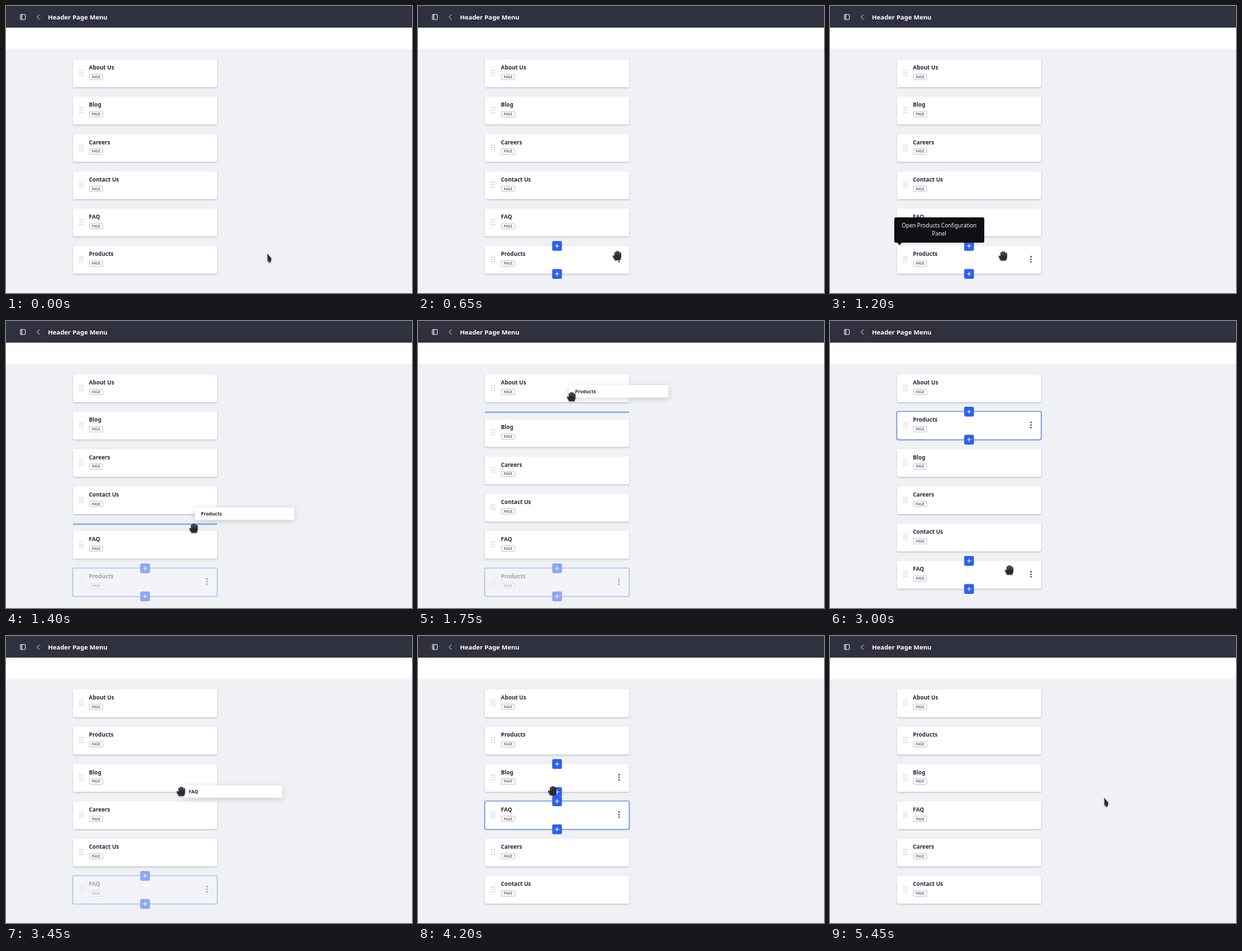
Animation of 600x425 px, one loop 7350 ms. Source, as an HTML page:

```html
<!DOCTYPE html>
<html lang="en">
<head>
<meta charset="utf-8">
<title>Menu reordering</title>
<style>
  html, body { margin: 0; width: 100%; height: 100%; overflow: hidden; background: #eff1f4; }
  svg { display: block; width: 100vw; height: 100vh; font-family: "Noto Sans", "Open Sans", sans-serif; }
  .title { font-size: 8.2px; font-weight: 600; fill: #272833; }
  .badge { font-size: 5px; font-weight: 600; fill: #6b6c7e; }
  .lift { filter: drop-shadow(0 1px 1px rgba(39, 40, 51, .28)); }
  .float { filter: drop-shadow(0 2px 4px rgba(39, 40, 51, .2)); }
  .cursor { filter: drop-shadow(.8px 1.2px .8px rgba(0, 0, 0, .3)); }
</style>
</head>
<body>
<svg viewBox="0 0 600 425" xmlns="http://www.w3.org/2000/svg">
  <rect width="600" height="425" fill="#eff1f4"/>
  <rect y="32" width="600" height="33" fill="#e7e9ee"/>
  <rect y="32" width="600" height="32.3" fill="#fff"/>
  <rect width="600" height="32" fill="#30313f"/>
  <g fill="none" stroke="#dcdce4">
    <rect x="21.2" y="12.6" width="7.4" height="7.4" rx=".5"/>
    <path d="M23.2 12.6V20" stroke-width="1.4"/>
    <path d="M49.6 12.6L46 16.4L49.6 20.2"/>
  </g>
  <text x="62" y="19.8" font-size="9.3" font-weight="600" fill="#fff">Header Page Menu</text>
  <g id="scene"></g>
</svg>
<script>
const LOOP = 7350, STEP = 50;
const LEFT = 99, WIDTH = 213, HEIGHT = 41.3, TOP = 79, PITCH = 55.25, SHIFT = 11;
const BLUE = '#2e5fee';
const scene = document.getElementById('scene');

const orders = [
  [0, ['About Us', 'Blog', 'Careers', 'Contact Us', 'FAQ', 'Products']],
  [1950, ['About Us', 'Products', 'Blog', 'Careers', 'Contact Us', 'FAQ']],
  [4000, ['About Us', 'Products', 'Blog', 'FAQ', 'Careers', 'Contact Us']]
];

// time, x, y, eased arrival
const path = [
  [0, 386, 366], [200, 386, 366], [900, 257, 371, 1], [1050, 256, 370], [1200, 256, 370],
  [1300, 281, 350], [1450, 276, 285], [1600, 256, 190], [1750, 227, 112], [1800, 220, 104],
  [1950, 214, 104], [2200, 225, 110], [2500, 281, 140, 1], [2650, 270, 315], [3050, 265, 371, 1],
  [3200, 265, 371], [3300, 264, 335], [3450, 259, 230], [3500, 258, 230], [3900, 193, 226, 1],
  [4000, 193, 226], [4200, 199, 229], [4600, 199, 229], [4950, 405, 239, 1], [LOOP, 405, 239]
];

const within = (t, from, to) => t >= from && t < to;
const cardTop = i => TOP + i * PITCH;

function cursorAt(t) {
  const n = path.findIndex(key => key[0] > t);
  const [t0, x0, y0] = path[n - 1], [t1, x1, y1, eased] = path[n];
  let k = (t - t0) / (t1 - t0);
  if (eased) k = k * k * (3 - 2 * k);
  return [x0 + (x1 - x0) * k, y0 + (y1 - y0) * k];
}

function cardUnder([x, y]) {
  if (x < LEFT || x > LEFT + WIDTH) return -1;
  return [0, 1, 2, 3, 4, 5].findIndex(i => y >= cardTop(i) && y <= cardTop(i) + HEIGHT);
}

function dropGap([, y], index) {
  if (index < 0 || index > 4) return -1;
  const part = (y - cardTop(index)) / HEIGHT;
  return part > .95 ? -1 : index + (part > .5 ? 1 : 0);
}

const dot = (x, y, r, fill) => `<circle cx="${x}" cy="${y}" r="${r}" fill="${fill}"/>`;

const plus = y => `<g transform="translate(205.5 ${y})">
  <rect x="-7.2" y="-7.2" width="14.4" height="14.4" rx="2" fill="${BLUE}"/>
  <path d="M-3 0H3M0 -3V3" stroke="#fff"/></g>`;

function card(name, y, { active, selected, dragged }) {
  const handle = [95.5, 99, 102.5].map(h =>
    dot(109.4, h - TOP, .8, '#a2a3b1') + dot(112.8, h - TOP, .8, '#a2a3b1')).join('');
  const kebab = [16, 19.8, 23.6].map(h => dot(297, h, 1.15, '#3c3d49')).join('');
  const frame = selected || dragged
    ? `<rect x="98.6" y="-.4" width="213.6" height="42" rx="2.5" fill="none" stroke="#6c92ec" stroke-width="1.4"/>` : '';
  return `<g transform="translate(0 ${y})">
    <rect class="${dragged ? '' : 'lift'}" x="${LEFT}" width="${WIDTH}" height="${HEIGHT}" rx="2" fill="${dragged ? '#f4f3f8' : '#fff'}"/>
    <g opacity="${dragged ? .4 : 1}">${handle}
      <text class="title" x="122.6" y="15.2">${name}</text>
      <rect x="123.2" y="22" width="19.8" height="8" rx="1" fill="#fff" stroke="#b5b6c2" stroke-width=".8"/>
      <text class="badge" x="133.1" y="27.9" text-anchor="middle">PAGE</text></g>
    <g opacity="${dragged ? .5 : 1}">${frame}${active ? kebab + plus(0) + plus(HEIGHT + .2) : ''}</g>
  </g>`;
}

const tooltip = opacity => `<g opacity="${opacity}">
  <path d="M99 350H106.5L102.8 354.3Z" fill="#0f0f14"/>
  <rect x="95" y="313" width="133" height="37.6" rx="2.5" fill="#0f0f14"/>
  <g font-size="8.05" fill="#f4f4f6" text-anchor="middle">
    <text x="161.3" y="328">Open Products Configuration</text>
    <text x="161.3" y="340.4">Panel</text></g></g>`;

const preview = (name, [x, y]) => `<g transform="translate(${x + 3} ${y - 9})">
  <rect class="float" width="147" height="18.5" rx="2" fill="#fff"/>
  <text x="9" y="12" font-size="7" font-weight="600" fill="#272833">${name}</text></g>`;

const HAND = 'M-3.5 6.8L-6.4 1.6Q-7 -.2 -5.6 -.2L-3.9 1.2V-4.6Q-3.2 -6 -2.2 -4.8V-1.2H-1.5V-6.2' +
  'Q-.6 -7.4 .3 -6.2V-1.2H1V-5.8Q2 -7 2.8 -5.6V-1H3.5V-4Q4.6 -5 5.4 -3.8V2.6L4 6.8Z';
const ARROW = 'M0 0L6.5 7.8L6 11L4.4 14.8L.3 11.2Z';

const pointer = ([x, y], hand) => `<path class="cursor" transform="translate(${x} ${y})"
  d="${hand ? HAND : ARROW}" fill="#2b2b33" stroke="${hand ? '#2b2b33' : '#fff'}" stroke-width=".4" stroke-linejoin="round"/>`;

function render(t) {
  const names = orders.filter(([start]) => t >= start).pop()[1];
  const cursor = cursorAt(t);
  const under = cardUnder(cursor);
  const dragging = within(t, 1250, 1950) || within(t, 3250, 4000);
  const gap = dragging ? dropGap(cursor, under) : -1;
  const selected = within(t, 1950, 3250) ? 1 : within(t, 4000, 5450) ? 3 : -1;

  let svg = names.map((name, i) => {
    const dragged = dragging && i === 5;
    const chosen = i === selected;
    return card(name, cardTop(i) + (gap >= 0 && i >= gap ? SHIFT : 0), {
      dragged, selected: chosen, active: dragged || chosen || (!dragging && i === under)
    });
  }).join('');

  if (gap >= 0) svg += `<rect x="${LEFT}" y="${cardTop(gap) - .3}" width="${WIDTH}" height="2.2" fill="#8ca8ef"/>`;
  if (within(t, 950, 1250)) svg += tooltip(Math.min(1, (t - 900) / 150));
  if (dragging) svg += preview(names[5], cursorAt(t + STEP));
  svg += pointer(cursor, dragging || (under >= 0 && !within(t, 2400, 2600)));
  scene.innerHTML = svg;
}

const start = performance.now();
let shown = -1;
function tick() {
  const time = (performance.now() - start) % LOOP;
  const step = Math.floor(time / STEP) * STEP;
  if (step !== shown) render(shown = step);
  requestAnimationFrame(tick);
}
tick();
</script>
</body>
</html>
```
